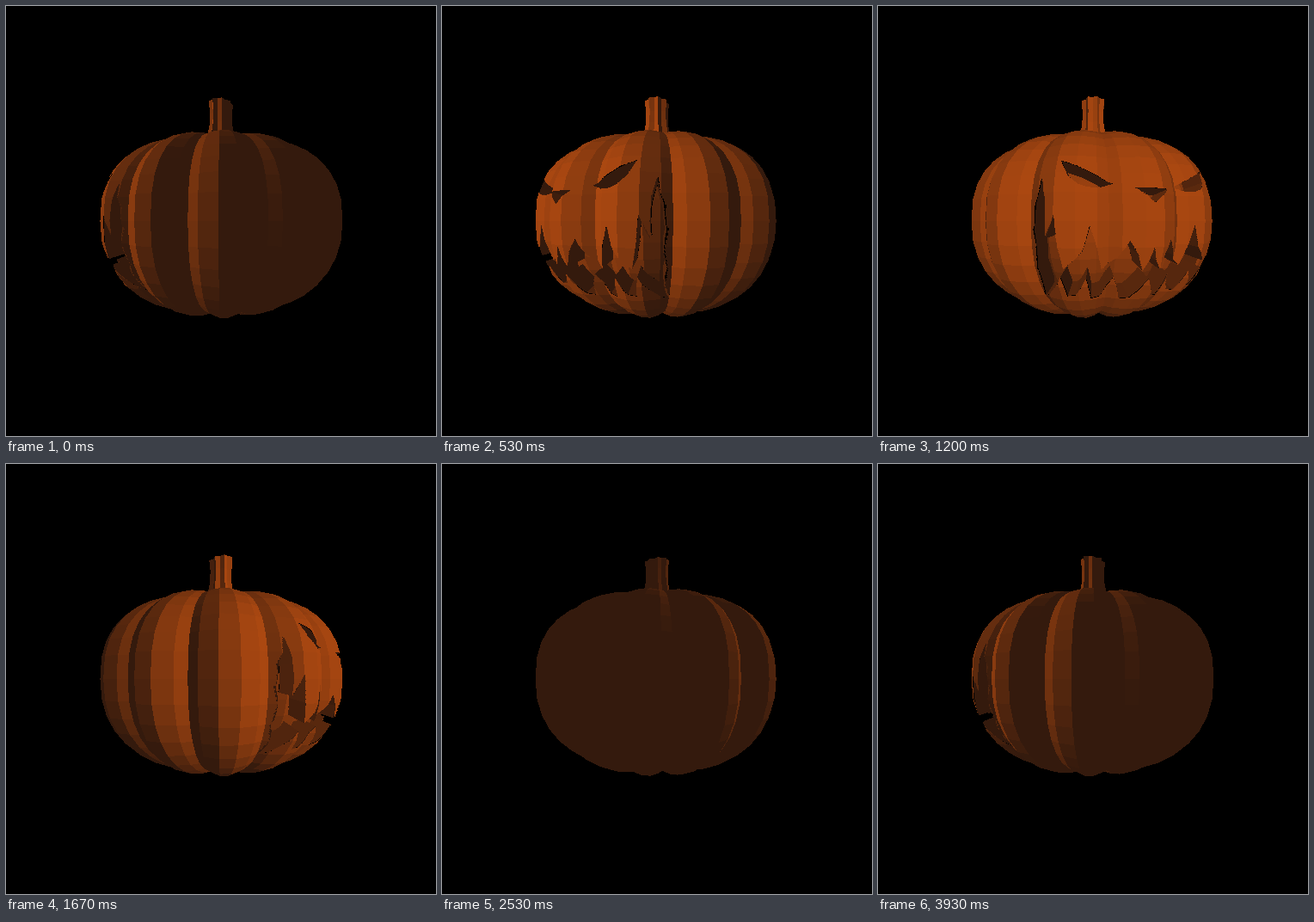
An HTML page with a canvas that plays this animation: 500x500 px, repeating every 3.99 s.

```html
<!DOCTYPE html>
<html lang="en">
<head>
<meta charset="utf-8">
<title>Carved pumpkin</title>
<style>
html, body { margin: 0; width: 100%; height: 100%; overflow: hidden; background: #000; }
canvas { display: block; }
</style>
</head>
<body>
<canvas id="stage" width="500" height="500"></canvas>
<script>
const SIZE = 500, MID = 250, FOCAL = 324, CAM = 2.5;
const LOOP = 3990, STEPS = 60;
const INNER = 0.86; // scale of the surface behind the carving
const RAD = Math.PI / 180;
const LIGHT_AZ = -12 * RAD, LIGHT_UP = 15 * RAD;
const LIGHT = [
  Math.cos(LIGHT_UP) * Math.sin(LIGHT_AZ), Math.sin(LIGHT_UP), Math.cos(LIGHT_UP) * Math.cos(LIGHT_AZ)
];
const AMBIENT = [52, 26, 13], DIFFUSE = [119, 46, 4];
const SOLID = 0, SKIN = 1, FLOOR = 2, WALL = 3;

const ctx = document.getElementById('stage').getContext('2d');
const image = ctx.createImageData(SIZE, SIZE);
const pixels = new Uint32Array(image.data.buffer);
const depth = new Float32Array(SIZE * SIZE);

// Carved face, in front-view coordinates
const mirror = pts => pts.map(([x, y]) => [-x, y]).reverse();
const eye = [[.21, .214], [.493, .347], [.475, .26], [.43, .208], [.37, .19], [.29, .19]];
const nose = [[-.11, .19], [.11, .19], [0, .105]];
const jaw = [
  [.025, -.23], [.06, -.285], [.09, -.19], [.137, -.11], [.19, -.21], [.27, -.285],
  [.31, -.16], [.36, -.025], [.4, -.17], [.49, -.27], [.53, -.14], [.55, .035],
  [.57, -.04], [.585, -.1], [.585, .1], [.59, .26], [.625, .1], [.632, -.05],
  [.605, -.28], [.53, -.49], [.5, -.32], [.44, -.45], [.4, -.44], [.36, -.33],
  [.3, -.47], [.24, -.46], [.19, -.33], [.13, -.48], [.08, -.47]
];
const mouth = [[0, -.147], ...jaw, [0, -.34], ...mirror(jaw)];
const holes = [eye, mirror(eye), nose, mouth];

function inside(poly, x, y) {
  let hit = false;
  for (let i = 0, j = poly.length - 1; i < poly.length; j = i++) {
    const [ax, ay] = poly[i], [bx, by] = poly[j];
    if ((ay > y) !== (by > y) && x < (bx - ax) * (y - ay) / (by - ay) + ax) hit = !hit;
  }
  return hit;
}

const CELL = 0.003, MASK = 480;
const mask = new Uint8Array(MASK * MASK);
for (let j = 0; j < MASK; j++) {
  for (let i = 0; i < MASK; i++) {
    const x = (i + .5) * CELL - .72, y = (j + .5) * CELL - .72;
    if (holes.some(h => inside(h, x, y))) mask[j * MASK + i] = 1;
  }
}
function carved(x, y) {
  const i = Math.floor((x + .72) / CELL), j = Math.floor((y + .72) / CELL);
  return i >= 0 && j >= 0 && i < MASK && j < MASK && mask[j * MASK + i] === 1;
}

// Body shape: superellipse profile with twelve lobes
const half = y => y > 0 ? { h: .706, n: 2.5 } : { h: .773, n: 2.25 };

function profile(y) {
  const { h, n } = half(y);
  return Math.pow(Math.max(0, 1 - Math.pow(Math.abs(y) / h, n)), 1 / n);
}

function lobe(deg) {
  const a = Math.abs(deg - 30 * Math.round(deg / 30));
  if (a < 3.55) return 1;
  if (a < 10.65) return 1 - .047 * (a - 3.55) / 7.1;
  return .953 - .043 * (a - 10.65) / 4.35;
}

function bodyPoint(deg, tilt) {
  const s = Math.sin(tilt * RAD), c = Math.max(0, Math.cos(tilt * RAD));
  const { h, n } = half(s), g = lobe(deg);
  const r = Math.pow(c, 2 / n) * g, u = Math.pow(Math.abs(s), 2 / n);
  const y = Math.sign(s) * h * u * (1 - (1 - g) * (s > 0 ? .12 : .6) * u ** 4);
  return [r * Math.sin(deg * RAD), y, r * Math.cos(deg * RAD)];
}

function surfaceZ(x, y) {
  const p = profile(y);
  let z = Math.sqrt(Math.max(0, p * p - x * x));
  for (let i = 0; i < 6; i++) {
    const r = p * lobe(Math.atan2(x, z) / RAD);
    z = Math.sqrt(Math.max(0, r * r - x * x));
  }
  return z;
}

const scale = (p, k) => p.map(v => v * k);
const sub = (a, b) => [a[0] - b[0], a[1] - b[1], a[2] - b[2]];
const dot = (a, b) => a[0] * b[0] + a[1] * b[1] + a[2] * b[2];
const cross = (a, b) => [
  a[1] * b[2] - a[2] * b[1], a[2] * b[0] - a[0] * b[2], a[0] * b[1] - a[1] * b[0]
];

function shade(normal, gain = 1) {
  const lit = Math.max(0, dot(normal, LIGHT) / (Math.hypot(...normal) || 1)) * gain;
  const [r, g, b] = AMBIENT.map((v, i) => Math.round(v + DIFFUSE[i] * lit));
  return (255 << 24 | b << 16 | g << 8 | r) >>> 0;
}

const quads = [];
function addQuad(pts, kind, normal, gain) {
  const n = normal || cross(sub(pts[2], pts[0]), sub(pts[3], pts[1]));
  quads.push({ pts, kind, color: shade(n, gain) });
}

function buildBody() {
  const cols = [];
  for (let k = 0; k < 12; k++) {
    for (const o of [-15, -10.65, -3.55, 3.55, 10.65]) cols.push(k * 30 + o);
  }
  cols.push(345);
  for (let i = 0; i < cols.length - 1; i++) {
    for (let t = -90; t < 90; t += 9) {
      const a = cols[i], b = cols[i + 1];
      const pts = [bodyPoint(a, t), bodyPoint(b, t), bodyPoint(b, t + 9), bodyPoint(a, t + 9)];
      addQuad(pts, SKIN);
      if (pts.every(p => p[2] > .25)) addQuad(pts.map(p => scale(p, INNER)), FLOOR, null, .85);
    }
  }
}

function buildWalls() {
  const CUTS = 6;
  for (const poly of holes) {
    poly.forEach((a, i) => {
      const b = poly[(i + 1) % poly.length];
      const at = k => [a[0] + (b[0] - a[0]) * k / CUTS, a[1] + (b[1] - a[1]) * k / CUTS];
      const len = Math.hypot(b[0] - a[0], b[1] - a[1]);
      let nx = (a[1] - b[1]) / len, ny = (b[0] - a[0]) / len;
      const m = at(CUTS / 2);
      if (!inside(poly, m[0] + nx * .002, m[1] + ny * .002)) { nx = -nx; ny = -ny; }
      for (let k = 0; k < CUTS; k++) {
        const [p, q] = [at(k), at(k + 1)].map(e => scale([...e, surfaceZ(...e)], .993));
        addQuad([p, q, scale(q, INNER), scale(p, INNER)], WALL, [nx, ny, 0]);
      }
    });
  }
}

function buildStem() {
  const rings = [[.68, .16], [.77, .115], [.86, .099], [.96, .095], [1.06, .105]];
  const point = (ring, i) => {
    const [y, r] = rings[ring], a = i * 22.5 * RAD;
    const w = r * (i % 2 ? .82 : 1.04);
    const tip = ring === 4 ? .016 * Math.cos(a) : 0;
    return [w * Math.sin(a), y + tip, w * Math.cos(a)];
  };
  for (let i = 0; i < 16; i++) {
    for (let k = 0; k < 4; k++) {
      addQuad([point(k, i), point(k, i + 1), point(k + 1, i + 1), point(k + 1, i)], SOLID);
    }
    const top = [0, 1.055, 0];
    addQuad([point(4, i), point(4, i + 1), top, top], SOLID);
  }
}

function triangle(a, b, c, kind, color) {
  const area = (b.x - a.x) * (c.y - a.y) - (b.y - a.y) * (c.x - a.x);
  if (Math.abs(area) < 1e-6 || (kind !== WALL && area > 0)) return;
  const x0 = Math.ceil(Math.min(a.x, b.x, c.x) - .5), x1 = Math.floor(Math.max(a.x, b.x, c.x) - .5);
  const y0 = Math.ceil(Math.min(a.y, b.y, c.y) - .5), y1 = Math.floor(Math.max(a.y, b.y, c.y) - .5);
  const tested = kind === SKIN || kind === FLOOR;
  for (let y = y0; y <= y1; y++) {
    for (let x = x0; x <= x1; x++) {
      const px = x + .5, py = y + .5;
      const u = ((b.x - px) * (c.y - py) - (b.y - py) * (c.x - px)) / area;
      const v = ((c.x - px) * (a.y - py) - (c.y - py) * (a.x - px)) / area;
      const w = 1 - u - v;
      if (u < -1e-5 || v < -1e-5 || w < -1e-5) continue;
      const near = u * a.w + v * b.w + w * c.w, at = y * SIZE + x;
      if (near <= depth[at]) continue;
      if (tested) {
        const k = (kind === FLOOR ? 1 / INNER : 1) / near;
        const mx = (u * a.mx + v * b.mx + w * c.mx) * k;
        const my = (u * a.my + v * b.my + w * c.my) * k;
        const front = u * a.mz + v * b.mz + w * c.mz > 0;
        const open = front && carved(mx, my);
        if (open !== (kind === FLOOR)) continue;
      }
      depth[at] = near;
      pixels[at] = color;
    }
  }
}

function render(step) {
  const turn = (step * 6 - 87.2) * RAD, co = Math.cos(turn), si = Math.sin(turn);
  pixels.fill(0xff000000);
  depth.fill(0);
  const project = ([x, y, z]) => {
    const w = 1 / (CAM - (z * co - x * si));
    return {
      x: MID + FOCAL * (x * co + z * si) * w, y: MID - FOCAL * y * w,
      w, mx: x * w, my: y * w, mz: z * w
    };
  };
  for (const { pts, kind, color } of quads) {
    const [a, b, c, d] = pts.map(project);
    triangle(a, b, c, kind, color);
    triangle(a, c, d, kind, color);
  }
  ctx.putImageData(image, 0, 0);
}

const startOf = i => Math.round(i * 20 / 3) * 10;
const begin = performance.now();
let shown = -1;

function tick() {
  const t = (performance.now() - begin) % LOOP;
  let step = STEPS - 1;
  while (step > 0 && startOf(step) > t) step--;
  if (step !== shown) render(shown = step);
  requestAnimationFrame(tick);
}

buildBody();
buildWalls();
buildStem();
tick();
</script>
</body>
</html>
```
